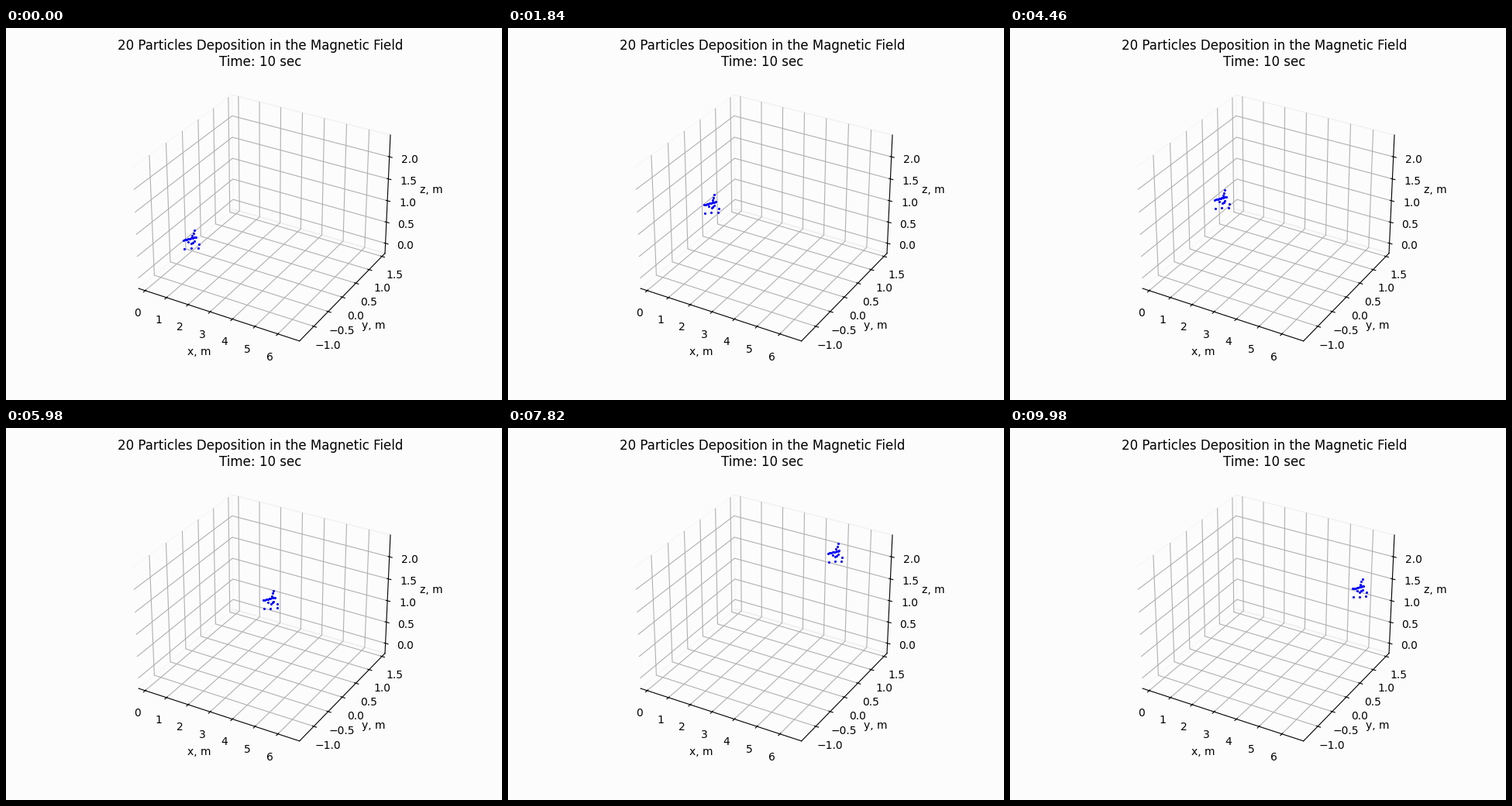
Animation of 640x480 px, one loop 10 s. Source, as a matplotlib script:

```python
import numpy as np
import matplotlib.pyplot as plt
from matplotlib.animation import FuncAnimation

WIDTH, HEIGHT, DPI = 640, 480, 100
FRAMES, INTERVAL = 500, 20
PAPER = "#fcfcfc"

# Pixels the leading particle passes through, one every STEP seconds
STEP = 1.02
KEYS = np.array([
    (243, 261), (264, 245), (265.5, 208), (258, 184), (266.5, 199),
    (303.5, 220), (352, 206), (397.5, 173), (437.5, 141.5), (454, 152),
    (454, 208),
])
START_SPEED, END_SPEED = (32, 0), (-4, 58)

# The cloud hangs below the leader in short strands: ends and count
STRANDS = [
    ((0, 0), (-3, 7), 3),
    ((-14, 12.5), (1.5, 9), 9),
    ((-4, 17), (0, 14), 3),
    ((-8, 15), (5.5, 17.5), 2),
    ((-13, 23.5), (4.5, 22.5), 3),
]
CLOUD = np.vstack([np.linspace(*strand) for strand in STRANDS])
SQUEEZE = 0.12  # share of its width the cloud loses on the way


def spline_speeds():
    """Speeds at KEYS that make the path a smooth clamped cubic spline."""
    n = len(KEYS)
    system = 4 * np.eye(n) + np.eye(n, k=1) + np.eye(n, k=-1)
    system[[0, -1]] = np.eye(n)[[0, -1]]
    chords = 3 * (KEYS[2:] - KEYS[:-2]) / STEP
    return np.linalg.solve(system,
                           np.vstack([START_SPEED, chords, END_SPEED]))


SPEEDS = spline_speeds()


def leader(t):
    """Position of the leading particle after t seconds."""
    i = int(t / STEP)
    s = t / STEP - i
    ease = s * s * (3 - 2 * s)
    bend = s * (1 - s) * ((1 - s) * SPEEDS[i] - s * SPEEDS[i + 1])
    return KEYS[i] + ease * (KEYS[i + 1] - KEYS[i]) + STEP * bend


def draw_box():
    """Empty 3D axes with grid, labels and title."""
    ax = fig.add_subplot(projection="3d", facecolor=PAPER)
    ax.set_xlim(-0.312, 6.928, view_margin=0)
    ax.set_ylim(-1.48, 1.62, view_margin=0)
    ax.set_zlim(-0.24, 2.484, view_margin=0)
    for axis, name in ((ax.xaxis, "x"), (ax.yaxis, "y"), (ax.zaxis, "z")):
        axis.pane.set_fill(False)
        axis.set_label_text(f"{name}, m")
    ax.set_title("20 Particles Deposition in the Magnetic Field\n"
                 "Time: 10 sec")
    return ax


fig = plt.figure(figsize=(WIDTH / DPI, HEIGHT / DPI), dpi=DPI,
                 facecolor=PAPER)

# The box never changes, so render it once and keep it as a backdrop
box = draw_box()
fig.canvas.draw()
backdrop = np.array(fig.canvas.buffer_rgba())
box.remove()
fig.figimage(backdrop, zorder=-1)

stage = fig.add_axes([0, 0, 1, 1])
stage.set_xlim(0, WIDTH)
stage.set_ylim(HEIGHT, 0)
stage.axis("off")
dots, = stage.plot([], [], "b.", markersize=2.5)


def update(frame):
    x, y = leader(frame * INTERVAL / 1000)
    width = 1 - SQUEEZE * frame / FRAMES
    dots.set_data(x + width * CLOUD[:, 0], y + CLOUD[:, 1])
    return dots,


anim = FuncAnimation(fig, update, frames=FRAMES, interval=INTERVAL,
                     repeat=True, repeat_delay=0)
plt.show()
```
